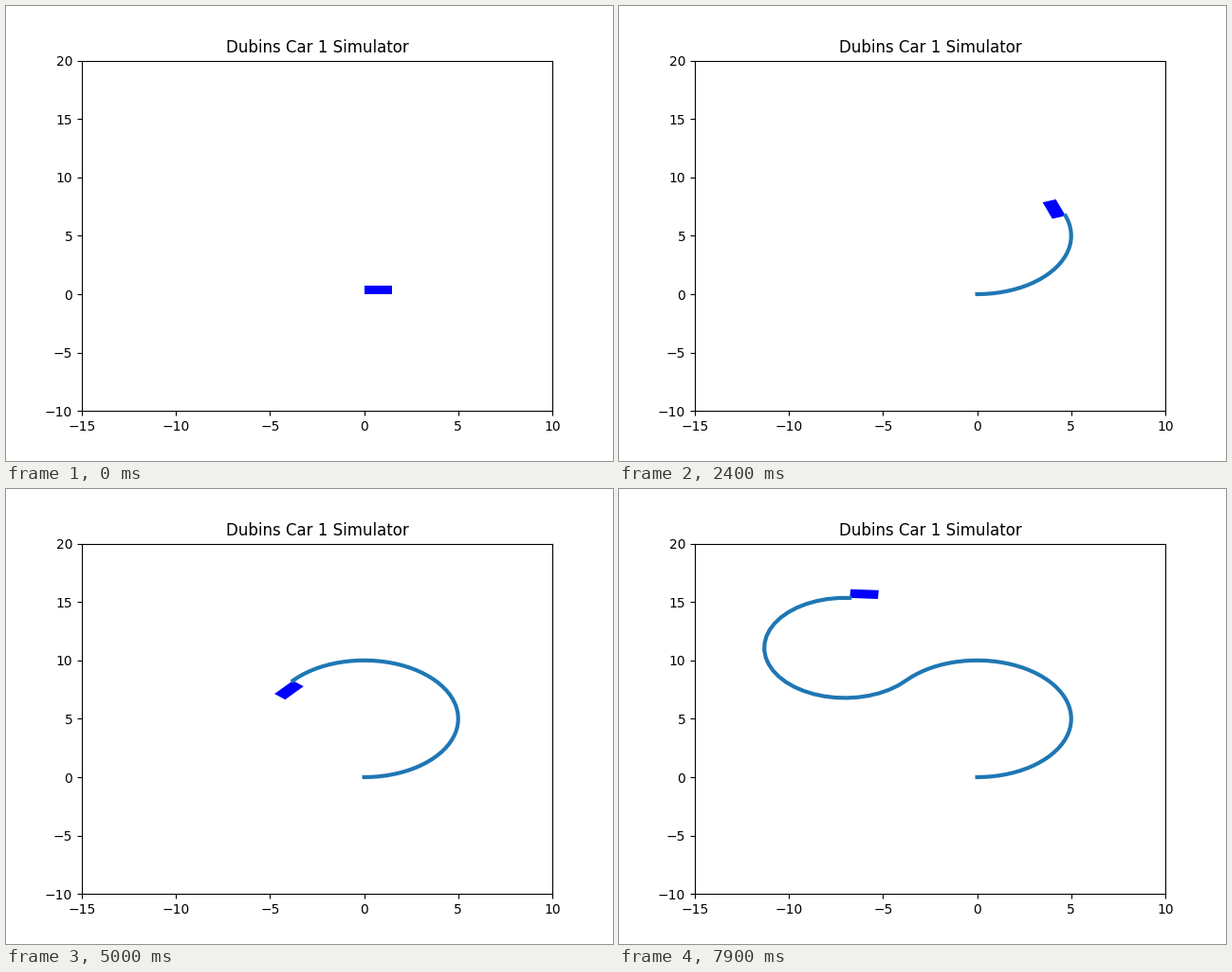
A matplotlib script that plays this animation: 640x480 px, repeating every 8 s.

```python
import numpy as np
import matplotlib.pyplot as plt
from matplotlib.animation import FuncAnimation
from matplotlib.patches import Rectangle

FRAMES, DT = 80, 0.1
SWITCH = 5.0                 # seconds until the car steers the other way
LEFT = (4.0, 0.8)            # speed, turn rate
RIGHT = (6.0, -1.4)


def arc(pose, control, t):
    """Exact pose after driving for t with constant speed and turn rate."""
    x, y, a = pose
    v, w = control
    b = a + w * t
    return np.array([x + v / w * (np.sin(b) - np.sin(a)),
                     y - v / w * (np.cos(b) - np.cos(a)), b])


def car_pose(t):
    pose = arc((0, 0, 0), LEFT, min(t, SWITCH))
    return arc(pose, RIGHT, t - SWITCH) if t > SWITCH else pose


path = np.array([car_pose(i * DT) for i in range(FRAMES)])

fig, ax = plt.subplots(figsize=(6.4, 4.8), dpi=100)
ax.set(xlim=(-15, 10), ylim=(-10, 20), title="Dubins Car 1 Simulator")

trail, = ax.plot([], [], lw=3)
car = ax.add_patch(Rectangle((0, 0), 1.5, 0.75, fc="b"))


def update(i):
    x, y, heading = path[i]
    trail.set_data(path[:i + 1, 0], path[:i + 1, 1])
    car.set_xy((x, y))
    car.set_angle(np.degrees(heading))
    return trail, car


anim = FuncAnimation(fig, update, frames=FRAMES, interval=DT * 1000,
                     init_func=lambda: update(0), repeat=True)
plt.show()
```
